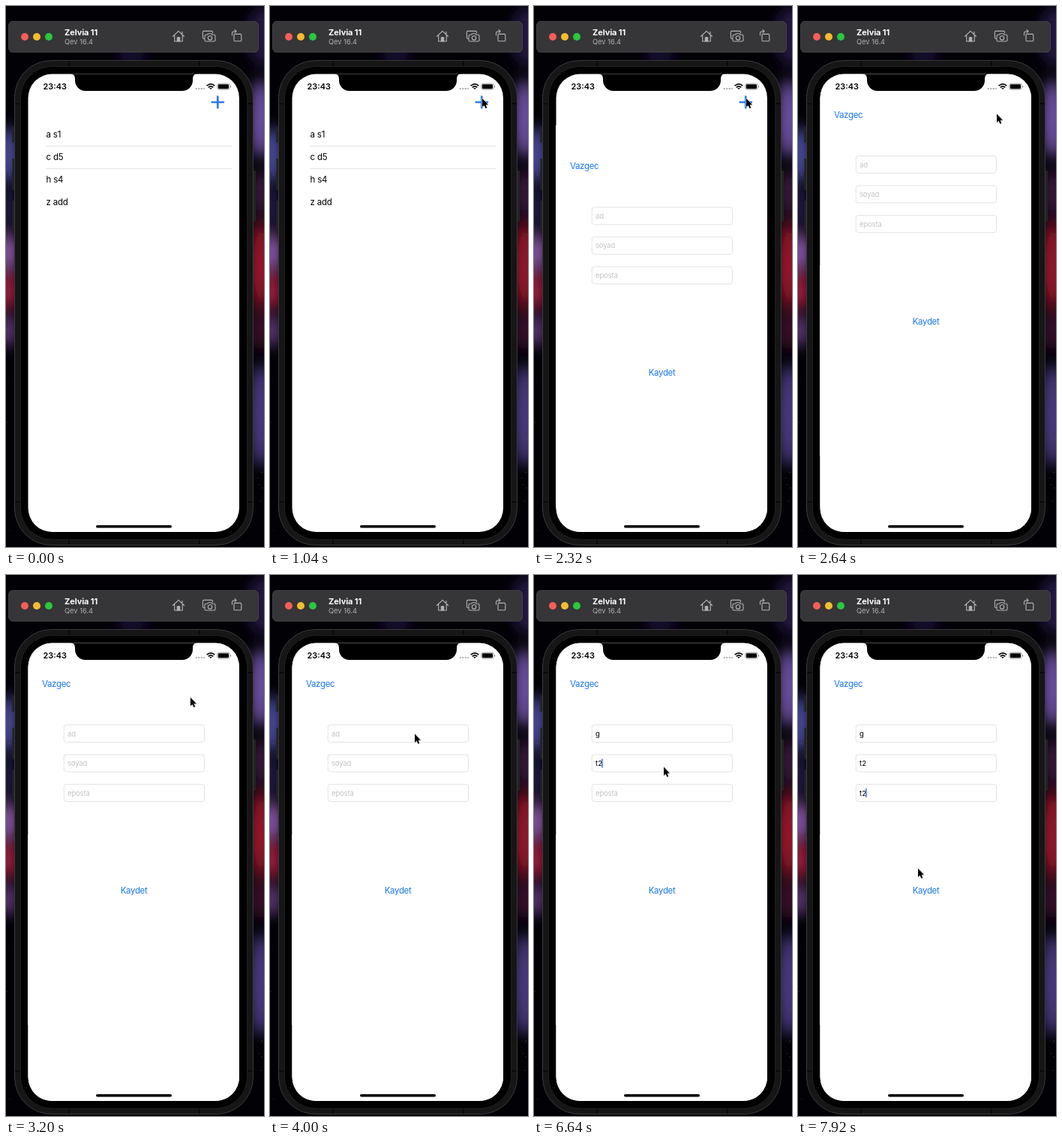
An HTML page for the animation above (8000 ms loop, 344x720 px).

```html
<!DOCTYPE html>
<html lang="tr">
<head>
<meta charset="utf-8">
<title>Contact form</title>
<style>
html, body { margin: 0; width: 100%; height: 100%; overflow: hidden; background: #020106; }
svg { display: block; width: 100vw; height: 100vh; }
text { font-family: Inter, Roboto, sans-serif; }
.list { font-size: 11.5px; letter-spacing: -.2px; }
.link { font-size: 11.5px; letter-spacing: -.35px; fill: #1c78ec; }
.field { font-size: 9.5px; letter-spacing: -.15px; }
.hint { fill: #c4c4c7; }
.icon { fill: none; stroke: #b4b4b7; stroke-width: 1.1; stroke-linejoin: round; stroke-linecap: round; }

.sheet { animation: rise 8s infinite; }
.cursor { animation: point 8s ease-in-out infinite; }
.caret { animation: caret 8s step-end infinite; }
.caret rect { animation: blink 1s step-end infinite; }
.key { animation: 8s step-end infinite; }
.name { animation-name: name; }
.last1 { animation-name: last1; }
.last2 { animation-name: last2; }
.mail1 { animation-name: mail1; }
.mail2 { animation-name: mail2; }

@keyframes rise {
  0%, 25.125% { transform: translateY(610px); animation-timing-function: cubic-bezier(.32, .39, .25, 1); }
  32.125%, 100% { transform: none; }
}
@keyframes point {
  0%, 8.5% { transform: translate(346px, 180px); }
  12.5%, 29.5% { transform: translate(283px, 123px); }
  33% { transform: translate(265px, 143.5px); }
  37% { transform: translate(262px, 148px); }
  46%, 64% { transform: translate(193px, 211.5px); }
  70%, 83.5% { transform: translate(173px, 255.5px); }
  85.5%, 95% { transform: translate(170px, 293px); }
  98.5%, 100% { transform: translate(160px, 390.5px); }
}
@keyframes caret {
  0% { transform: translate(81.5px, 205px); visibility: hidden; }
  54% { transform: translate(81.5px, 205px); visibility: visible; }
  61% { transform: translate(87.8px, 205px); }
  70.5% { transform: translate(81.5px, 244.5px); }
  76% { transform: translate(85px, 244.5px); }
  79% { transform: translate(90.2px, 244.5px); }
  86% { transform: translate(81.5px, 284px); }
  92% { transform: translate(85px, 284px); }
  94.5%, 100% { transform: translate(90.2px, 284px); visibility: visible; }
}
@keyframes blink { 0% { opacity: 0; } 28%, 100% { opacity: 1; } }
@keyframes name { 0% { visibility: hidden; } 61%, 100% { visibility: visible; } }
@keyframes last1 { 0% { visibility: hidden; } 76%, 100% { visibility: visible; } }
@keyframes last2 { 0% { visibility: hidden; } 79%, 100% { visibility: visible; } }
@keyframes mail1 { 0% { visibility: hidden; } 92%, 100% { visibility: visible; } }
@keyframes mail2 { 0% { visibility: hidden; } 94.5%, 100% { visibility: visible; } }
</style>
</head>
<body>
<svg viewBox="0 0 344 720" preserveAspectRatio="none">
  <defs>
    <filter id="soft" x="-50%" y="-50%" width="200%" height="200%"><feGaussianBlur stdDeviation="9"/></filter>
    <clipPath id="screen"><rect x="29.5" y="90.5" width="281.5" height="609.5" rx="32"/></clipPath>
    <rect id="box" x="77.2" width="187.3" height="23" rx="3.5" fill="#fff" stroke="#dededf" stroke-width=".8"/>
    <rect id="cover" x="80" width="60" height="18" fill="#fff"/>
  </defs>

  <!-- night sky -->
  <rect width="344" height="720" fill="#020106"/>
  <g filter="url(#soft)">
    <ellipse cx="168" cy="66" rx="22" ry="9" fill="#1b1040"/>
    <ellipse cx="344" cy="40" rx="22" ry="40" fill="#24133f"/>
    <ellipse cx="2" cy="198" rx="14" ry="38" fill="#4a4c9c"/>
    <ellipse cx="2" cy="270" rx="14" ry="30" fill="#1d1440"/>
    <ellipse cx="2" cy="328" rx="14" ry="26" fill="#8a56a4"/>
    <ellipse cx="2" cy="378" rx="14" ry="28" fill="#9c1c3c"/>
    <ellipse cx="2" cy="432" rx="14" ry="22" fill="#57356f"/>
    <ellipse cx="340" cy="150" rx="16" ry="52" fill="#6a50a0"/>
    <ellipse cx="340" cy="250" rx="14" ry="34" fill="#351338"/>
    <ellipse cx="340" cy="345" rx="16" ry="58" fill="#97142c"/>
    <ellipse cx="340" cy="430" rx="14" ry="28" fill="#3a102c"/>
    <ellipse cx="340" cy="545" rx="16" ry="68" fill="#493a80"/>
  </g>
  <g id="stars" fill="#8d86b8"></g>

  <!-- window bar -->
  <rect x="3.5" y="20.5" width="333" height="41" rx="5.5" fill="#363538" stroke="#48474a" stroke-width=".8"/>
  <circle cx="25" cy="41" r="5" fill="#f35f57"/>
  <circle cx="41" cy="41" r="5" fill="#f6bb2f"/>
  <circle cx="57" cy="41" r="5" fill="#2ac840"/>
  <text x="78" y="39" font-size="11" font-weight="700" fill="#fff" letter-spacing="-.1">Zelvia 11</text>
  <text x="78" y="51" font-size="9.3" fill="#aeaeb1">Qev 16.4</text>
  <g class="icon">
    <path d="M222.5 40.5 230 33.3 237.5 40.5M224.7 39V47H235.3V39M235 37.5V34.2"/>
    <path d="M228.3 47V41.8H231.7V47Z" fill="#b4b4b7"/>
    <path d="M264.5 43.5H264a1.6 1.6 0 0 1-1.6-1.6V35a1.6 1.6 0 0 1 1.6-1.6H274a1.6 1.6 0 0 1 1.6 1.6V36"/>
    <path d="M267 38.3H268.5L269.5 36.8H274L275 38.3H277.4a1.6 1.6 0 0 1 1.6 1.6V45.4a1.6 1.6 0 0 1-1.6 1.6H266.6a1.6 1.6 0 0 1-1.6-1.6V39.9a1.6 1.6 0 0 1 1.6-1.6Z"/>
    <circle cx="272" cy="42.4" r="2.7"/>
    <rect x="304" y="37.4" width="9.8" height="9.4" rx="1.4"/>
    <path d="M301.5 39V36.500Q301.500 33.700 304.500 33.700H307M305 31.700 307.200 33.700 305 35.700"/>
  </g>

  <!-- phone body -->
  <g fill="#232324">
    <rect x="8.500" y="160" width="4" height="22" rx="1"/>
    <rect x="8.500" y="203" width="4" height="42" rx="1"/>
    <rect x="8.500" y="259" width="4" height="41" rx="1"/>
    <rect x="329" y="219" width="4" height="68" rx="1"/>
  </g>
  <rect x="11.500" y="72.500" width="318" height="645" rx="49" fill="#161617" stroke="#3a3a3c"/>
  <path d="M84 73V80M258 73V80M12 130H19M322 130H329M12 660H19M322 660H329M84 710V717M258 710V717" stroke="#0a0a0a" stroke-width="2"/>
  <rect x="19.500" y="80.500" width="302" height="629.500" rx="42" fill="#000" stroke="#242425" stroke-width=".8"/>

  <!-- screen -->
  <g clip-path="url(#screen)">
    <rect x="29" y="90" width="283" height="611" fill="#fff"/>
    <path d="M273.700 128H291M282.300 119.500V136.500" stroke="#2f79ec" stroke-width="2.700"/>
    <g class="list">
      <text x="53.500" y="175.300">a s1</text>
      <text x="53.500" y="205.300">c d5</text>
      <text x="53.500" y="235.300">h s4</text>
      <text x="53.500" y="265.300">z add</text>
    </g>
    <path d="M53 186.500H301M53 216.500H301" stroke="#e3e3e5"/>

    <g class="sheet">
      <rect x="29" y="90.500" width="283" height="612" fill="#fff"/>
      <text class="link" x="48" y="149">Vazgec</text>
      <text class="link" x="152.700" y="424">Kaydet</text>
      <use href="#box" y="199.500"/>
      <use href="#box" y="239"/>
      <use href="#box" y="278.500"/>
      <g class="field hint">
        <text x="82" y="214.500">ad</text>
        <text x="82" y="254">soyad</text>
        <text x="82" y="293.500">eposta</text>
      </g>
      <g class="field">
        <g class="key name"><use href="#cover" y="202"/><text x="82" y="214.500">g</text></g>
        <g class="key last1"><use href="#cover" y="241.500"/><text x="82" y="254">t</text></g>
        <text class="key last2" x="85.300" y="254">2</text>
        <g class="key mail1"><use href="#cover" y="281"/><text x="82" y="293.500">t</text></g>
        <text class="key mail2" x="85.300" y="293.500">2</text>
      </g>
      <g class="caret"><rect width="1.400" height="12" fill="#3d60e6"/></g>
    </g>

    <!-- status bar -->
    <path d="M86 90H255Q249 90.500 249 97V99a14 14 0 0 1-14 14H106a14 14 0 0 1-14-14V97Q92 90.500 86 90Z"/>
    <text x="49.500" y="111" font-size="10.900" font-weight="600">23:43</text>
    <path d="M252.700 110H265" stroke="#b9b9bb" stroke-width="1.900" stroke-dasharray="2.300 1.200"/>
    <g fill="none" stroke="#000" stroke-width="1.700">
      <path d="M267.700 106.200Q273 101.400 278.300 106.200M269.700 108.400Q273 105.400 276.300 108.400"/>
      <path d="M271.600 109.300H274.400L273 110.800Z" fill="#000" stroke-width=".6"/>
    </g>
    <rect x="281.700" y="103.200" width="16.400" height="8" rx="2.300" fill="none" stroke="#8c8c8e" stroke-width=".8"/>
    <rect x="282.800" y="104.200" width="14.200" height="6" rx="1.400"/>
    <path d="M299 105.700a1.600 1.600 0 0 1 0 3Z" fill="#8c8c8e"/>
    <rect x="120" y="691" width="101" height="3.500" rx="1.750"/>
  </g>

  <path class="cursor" d="M0 0V11.600L2.600 9.200 4.400 13.300 6.400 12.400 4.600 8.500H8.200Z" stroke="#fff" stroke-width=".9" paint-order="stroke"/>
</svg>
<script>
const stars = document.getElementById('stars');
let seed = 7;
const random = () => (seed = seed * 16807 % 2147483647) / 2147483647;
for (let i = 0; i < 70; i++) {
  const star = document.createElementNS(stars.namespaceURI, 'circle');
  const edge = random() * 24;
  star.setAttribute('cx', edge < 11 ? edge : 320 + edge);
  star.setAttribute('cy', random() * 720);
  star.setAttribute('r', .2 + random() * .35);
  star.setAttribute('opacity', .3 + random() * .5);
  stars.append(star);
}
</script>
</body>
</html>
```
